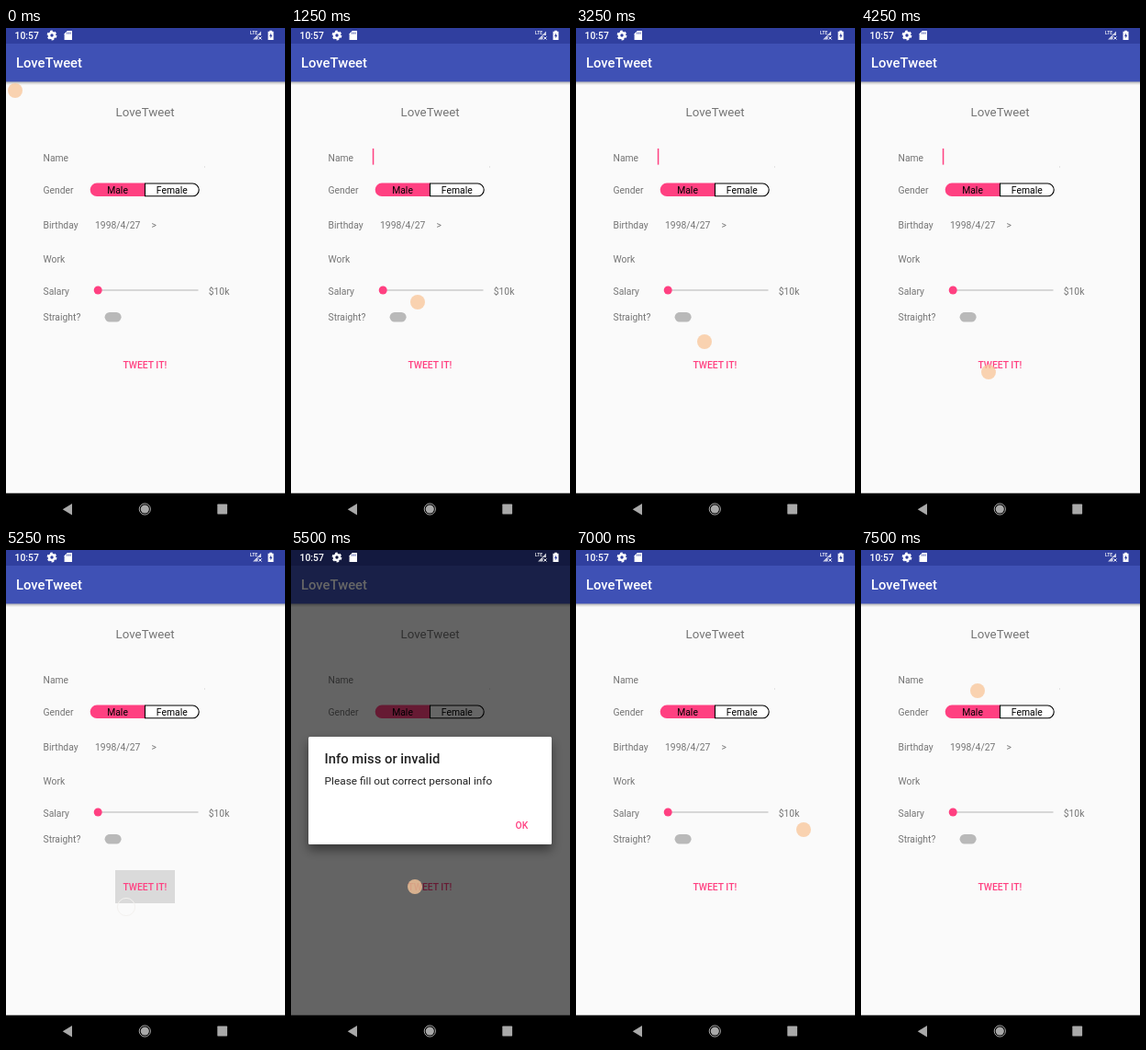
An HTML page that plays this animation: 304x537 px, repeating every 8 s.

```html
<!DOCTYPE html>
<html lang="en">
<head>
<meta charset="utf-8">
<title>LoveTweet</title>
<style>
  html, body { margin: 0; width: 100%; height: 100%; overflow: hidden; background: #fafafa; }
  svg { display: block; width: 100%; height: 100%; }
  text { font: 10.36px Roboto, sans-serif; fill: #757575; }
  .medium { font-weight: 500; }
  .pink { fill: #ff4081; }
  .black { fill: #000; }
  .white { fill: #fff; }
</style>
</head>
<body>
<svg viewBox="0 0 304 537">
  <defs>
    <linearGradient id="barShadow" x2="0" y2="1">
      <stop stop-color="#000" stop-opacity=".3"/>
      <stop offset="1" stop-color="#000" stop-opacity="0"/>
    </linearGradient>
    <filter id="dialogShadow" x="-20%" y="-20%" width="140%" height="150%">
      <feDropShadow dx="0" dy="6" stdDeviation="6" flood-opacity=".45"/>
    </filter>
    <clipPath id="okArea"><path d="M228 284h48v28h-48z"/></clipPath>
  </defs>

  <rect width="304" height="537" fill="#fafafa"/>
  <rect y="58" width="304" height="4" fill="url(#barShadow)"/>
  <rect width="304" height="58.4" fill="#3f51b5"/>
  <rect width="304" height="17" fill="#303f9f"/>
  <text class="medium white" x="11" y="43.3" style="font-size:14.8px">LoveTweet</text>
  <text x="119.6" y="96" style="font-size:13.3px">LoveTweet</text>

  <g id="labels"></g>
  <rect x="216" y="150.5" width="1" height="1" fill="#ccc"/>
  <rect id="caret" class="pink" x="88.8" y="131" width="1.5" height="17.6"/>

  <path class="pink" d="M151.5 168.5H99a7.3 7.3 0 0 0 0 14.6h52.5z"/>
  <path fill="#fff" stroke="#000" stroke-width="1.1" d="M151.5 169H203.3a6.9 6.9 0 0 1 0 13.8H151.5z"/>
  <text class="black" x="110.2" y="180">Male</text>
  <text class="black" x="163.8" y="180">Female</text>

  <path d="M100 285H209.5" stroke="#cbcbcb" stroke-width="1.4"/>
  <circle class="pink" cx="100.2" cy="285" r="4.5"/>
  <rect x="107.6" y="309" width="18" height="10.6" rx="5.3" fill="#b9b9b9"/>

  <rect id="pressed" x="119" y="348" width="65" height="36" fill="#dadada"/>
  <text class="medium pink" x="127.5" y="370">TWEET IT!</text>

  <g id="dialog">
    <rect width="304" height="506" opacity=".6"/>
    <rect x="19" y="203" width="265" height="117" rx="1.5" fill="#fff" filter="url(#dialogShadow)"/>
    <text class="medium" x="36.6" y="232" style="font-size:14.8px;fill:#212121">Info miss or invalid</text>
    <text x="36.6" y="255" style="font-size:11.84px;fill:#212121">Please fill out correct personal info</text>
    <circle id="ripple" cx="246" cy="302" r="14.3" fill="#dedede" clip-path="url(#okArea)"/>
    <text class="medium pink" x="244.6" y="302.7">OK</text>
  </g>

  <g id="status" fill="#fff">
    <text class="medium white" x="9.6" y="12">10:57</text>
    <circle cx="50" cy="8" r="3" fill="none" stroke="#fff" stroke-width="2.6"/>
    <circle cx="50" cy="8" r="4.6" fill="none" stroke="#fff" stroke-width="1.6" stroke-dasharray="2.6 2.217"/>
    <path d="M66.8 3H72v10H63.6V6.2z"/>
    <path d="M66.6 4.6v2M68.4 4.6v2M70.2 4.6v2" stroke="#303f9f" stroke-width=".8"/>
    <path d="M278 3.5V8h-3.5v4.5H269z" opacity=".75"/>
    <path d="M275.5 9.5l3 3m0-3l-3 3" stroke="#fff"/>
    <text class="medium white" x="266" y="7" style="font-size:5px">LTE</text>
    <path d="M287.2 3.8v-1h2.6v1h1.7V13h-6V3.8z"/>
    <path d="M289 5.5l-2 3.4h1.3v2.4l2-3.5H289z" fill="#303f9f"/>
  </g>

  <rect y="505.7" width="304" height="32"/>
  <g fill="#a9a9a9">
    <path d="M72 517v12.4L61.7 523.2z"/>
    <circle cx="151.3" cy="523" r="4.6"/>
    <circle cx="151.3" cy="523" r="6.1" fill="none" stroke="#a9a9a9" stroke-width="1"/>
    <rect x="230.3" y="517.6" width="10.8" height="10.8" rx=".6"/>
  </g>

  <circle id="touch" r="8" fill="#f9c79b" fill-opacity=".78"/>
  <circle id="ring" r="9.6" fill="none" stroke-width="1"/>
</svg>
<script>
const LOOP = 8000, STEP = 250;
const $ = id => document.getElementById(id);

const labels = [
  ["Name", 40.5, 145], ["Gender", 40.5, 180], ["Birthday", 40.5, 218],
  ["1998/4/27", 97, 218], [">", 158.5, 218], ["Work", 40.5, 254.5],
  ["Salary", 40.5, 289.5], ["$10k", 220.7, 289.5], ["Straight?", 40.5, 318.3]
];
$("labels").innerHTML = labels.map(([s, x, y]) => `<text x="${x}" y="${y}">${s}</text>`).join("");

// Each stroke is a run of [time, x, y] points; the touch is hidden between strokes.
const strokes = [
  [[0, 10, 68], [500, 75, 161]],
  [[1250, 138, 298], [1750, 25, 331], [2250, 120, 320], [2750, 160, 365],
   [3250, 140, 341], [3750, 147, 360], [4750, 131, 388], [5000, 131, 388]],
  [[5500, 135, 366], [6500, 241, 327]],
  [[7000, 248, 304], [7250, 248, 304]],
  [[7500, 127, 153], [7750, 127, 153]]
];

function touchAt(t) {
  const stroke = strokes.find(s => t >= s[0][0] && t <= s.at(-1)[0]);
  if (!stroke) return null;
  const i = Math.max(1, stroke.findIndex(p => p[0] >= t));
  const [t0, x0, y0] = stroke[i - 1], [t1, x1, y1] = stroke[i];
  const k = (t - t0) / (t1 - t0);
  return [x0 + (x1 - x0) * k, y0 + (y1 - y0) * k];
}

const show = (id, on) => $(id).setAttribute("visibility", on ? "visible" : "hidden");

function place(id, [x, y]) {
  $(id).setAttribute("cx", x);
  $(id).setAttribute("cy", y);
}

function draw(now) {
  const t = Math.floor(now % LOOP / STEP) * STEP;
  const pressing = t === 5250, confirming = t === 6750;

  show("caret", t >= 750 && t < 5250 && (t < 1000 || t % 1000 < 500));
  show("pressed", pressing);
  show("dialog", t >= 5500 && t < 7000);
  show("ripple", confirming);

  const touch = touchAt(t);
  show("touch", touch);
  if (touch) place("touch", touch);

  show("ring", pressing || confirming);
  place("ring", pressing ? [131, 388] : [241, 327]);
  $("ring").setAttribute("stroke", pressing ? "#f3f1ef" : "#88776a");

  requestAnimationFrame(draw);
}
requestAnimationFrame(draw);
</script>
</body>
</html>
```
